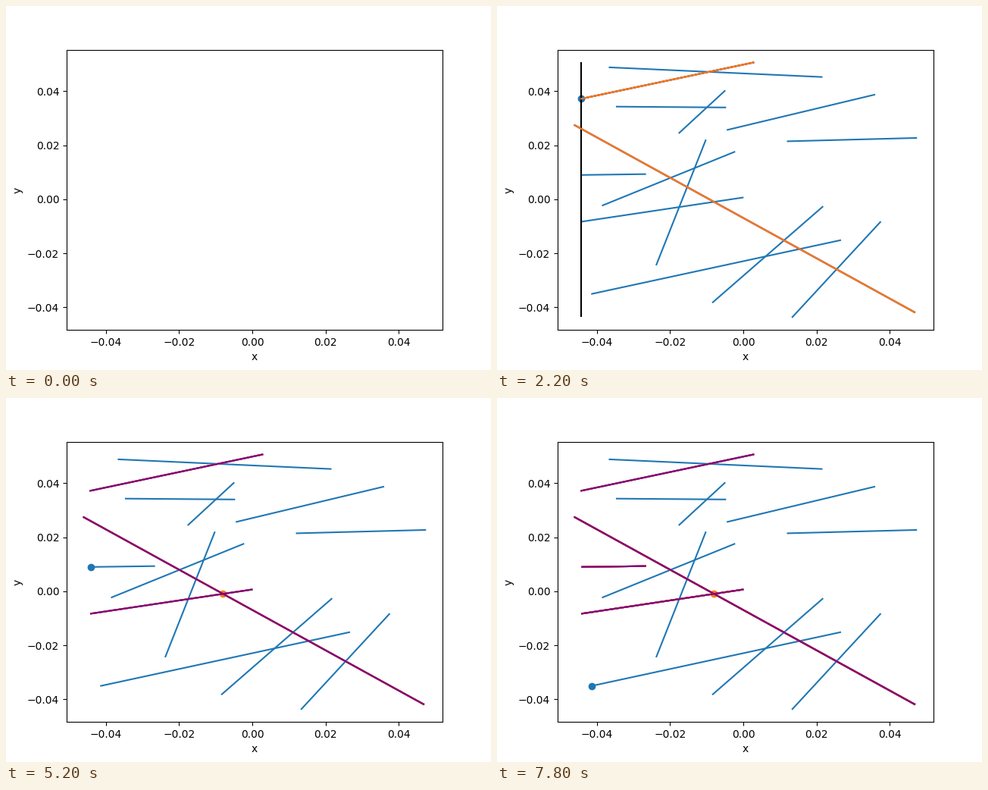
A matplotlib script that plays this animation: 640 by 480 pixels, repeating every 8 s.

```python
import matplotlib.pyplot as plt
from matplotlib.animation import FuncAnimation

STEP_MS, FRAMES = 200, 40
NEVER = FRAMES + 1

# Segment ends in stage pixels, sorted by their left end
SEGMENTS = [
    (102.6, 157.2, 551.0, 403.8), (111.3, 122.3, 338.3, 74.5),
    (112.2, 284.3, 324.3, 252.6), (112.4, 222.8, 195.6, 221.7),
    (125.3, 379.6, 453.0, 308.9), (139.5, 262.9, 313.3, 192.4),
    (148.5, 80.9, 428.5, 93.6), (158.0, 132.7, 301.3, 133.8),
    (210.4, 341.0, 275.3, 177.2), (240.5, 167.3, 300.5, 112.0),
    (284.8, 390.7, 429.6, 264.8), (304.2, 163.3, 498.0, 117.0),
    (383.6, 178.4, 553.2, 174.0), (389.8, 410.2, 505.8, 284.9),
]
SWEEP_TOP, SWEEP_BOTTOM = 74.4, 410.4

fig, ax = plt.subplots(figsize=(6.4, 4.8), dpi=100)
ax.set_xlim(-0.05065, 0.0519)
ax.set_ylim(-0.04837, 0.0554)
ax.set_xlabel("x")
ax.set_ylabel("y")


def to_data(px, py):
    return ax.transData.inverted().transform((px, 480 - py))


ENDS = [(to_data(x0, y0), to_data(x1, y1)) for x0, y0, x1, y1 in SEGMENTS]
Y_MAX = to_data(0, SWEEP_TOP)[1]
Y_MIN = to_data(0, SWEEP_BOTTOM)[1]

shown = []   # [artist, first step, end step]
step = 0


def show(artist):
    """Reveal an artist on the next step and return its record."""
    global step
    step += 1
    record = [artist, step, NEVER]
    shown.append(record)
    return record


def hide(record):
    global step
    step += 1
    record[2] = step


def stroke(i, color):
    (x0, y0), (x1, y1) = ENDS[i]
    return ax.plot([x0, x1], [y0, y1], color=color)[0]


def dot(point, color):
    return ax.scatter(*point, color=color)


def crossing(i, j):
    """Point shared by two segments, or None."""
    (a, b), (c, d) = ENDS[i], ENDS[j]
    r, s, q = b - a, d - c, c - a
    det = r[0] * s[1] - r[1] * s[0]
    t = (q[0] * s[1] - q[1] * s[0]) / det
    u = (q[0] * r[1] - q[1] * r[0]) / det
    return a + t * r if 0 <= t <= 1 and 0 <= u <= 1 else None


def height(i, x):
    (x0, y0), (x1, y1) = ENDS[i]
    return y0 + (y1 - y0) * (x - x0) / (x1 - x0)


def check(new, other):
    show(stroke(new, "tab:orange"))
    show(stroke(other, "tab:orange"))
    point = crossing(new, other)
    if point is not None:
        show(dot(point, "tab:orange"))
    show(stroke(other, "purple"))
    show(stroke(new, "purple"))


def sweep():
    """Insert segments from left to right, testing the neighbours of each."""
    step_one = step + 1
    for i in range(len(ENDS)):
        shown.append([stroke(i, "tab:blue"), step_one, NEVER])
    active = []

    for i, (start, _) in enumerate(ENDS):
        event = show(dot(start, "tab:blue"))
        if step >= FRAMES - 1:
            return
        line = show(ax.vlines(start[0], Y_MIN, Y_MAX, color="black"))
        show(stroke(i, "purple"))
        active.append(i)
        active.sort(key=lambda k: -height(k, start[0]))
        at = active.index(i)
        if at > 0:
            check(i, active[at - 1])
        if at + 1 < len(active):
            check(i, active[at + 1])
        hide(event)
        hide(line)


def build():
    global step
    step = 1   # the first step belongs to the bare segments
    sweep()
    for record in shown[:len(ENDS)]:
        record[1] = 1


def update(n):
    for artist, first, end in shown:
        artist.set_visible(first <= n < end)
    return [record[0] for record in shown]


build()
# Hold the view steady whatever was added
ax.set_xlim(-0.05065, 0.0519)
ax.set_ylim(-0.04837, 0.0554)

anim = FuncAnimation(fig, update, frames=FRAMES, interval=STEP_MS,
                     init_func=lambda: update(0), repeat=True,
                     repeat_delay=0, blit=False)
plt.show()
```
